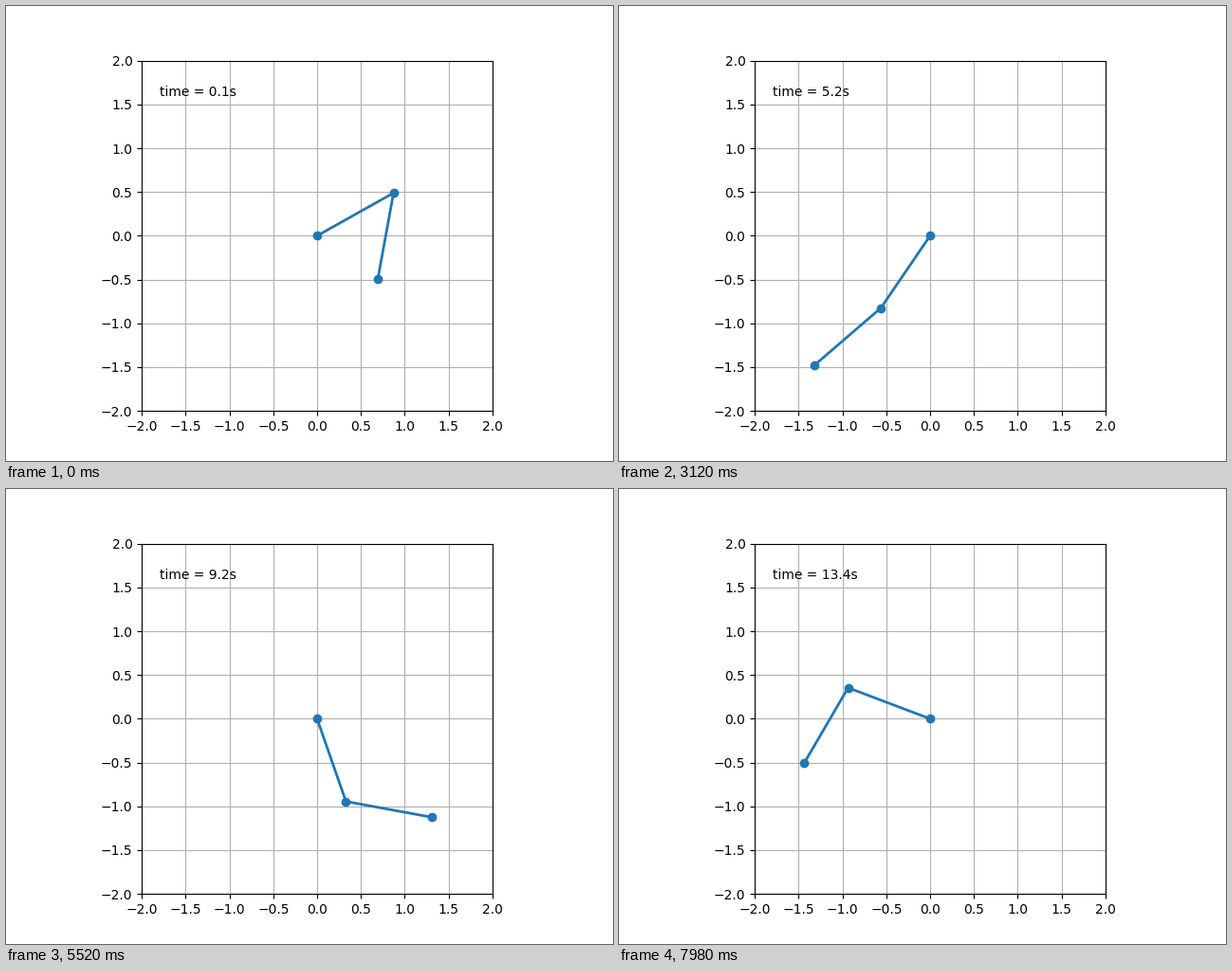
A matplotlib script that plays this animation: 640 by 480 pixels, repeating every 8 s.

```python
from math import cos, radians, sin

import matplotlib.pyplot as plt
from matplotlib.animation import FuncAnimation

G = 9.8          # gravity; both rods have length 1 and both bobs mass 1
DT = 0.05        # time between stored states
SUBSTEPS = 50    # integrator steps per stored state
TICK = 20        # ms per drawn frame
HOLD = 3         # drawn frames per pose
FRAMES = 400


def derivs(state):
    a1, w1, a2, w2 = state
    s, c = sin(a2 - a1), cos(a2 - a1)
    den = 2 - c * c
    acc1 = (w1 * w1 * s * c + G * sin(a2) * c + w2 * w2 * s
            - 2 * G * sin(a1)) / den
    acc2 = (-w2 * w2 * s * c + 2 * G * sin(a1) * c - 2 * w1 * w1 * s
            - 2 * G * sin(a2)) / den
    return w1, acc1, w2, acc2


def shift(state, slope, h):
    return [v + h * d for v, d in zip(state, slope)]


def rk4(state, h):
    k1 = derivs(state)
    k2 = derivs(shift(state, k1, h / 2))
    k3 = derivs(shift(state, k2, h / 2))
    k4 = derivs(shift(state, k3, h))
    mean = [(a + 2 * b + 2 * c + d) / 6 for a, b, c, d in zip(k1, k2, k3, k4)]
    return shift(state, mean, h)


def solve(count):
    state = [radians(120), 0.0, radians(-10), 0.0]
    states = [state]
    for _ in range(count):
        for _ in range(SUBSTEPS):
            state = rk4(state, DT / SUBSTEPS)
        states.append(state)
    return states


def step_of(frame):
    return 1 + 2 * (frame // HOLD)


states = solve(step_of(FRAMES - 1))

fig = plt.figure(figsize=(6.4, 4.8), dpi=100)
ax = fig.add_subplot(autoscale_on=False, xlim=(-2, 2), ylim=(-2, 2))
ax.set_aspect("equal")
ax.grid()
rods, = ax.plot([], [], "o-", lw=2)
clock = ax.text(0.05, 0.9, "", transform=ax.transAxes)


def draw(frame):
    step = step_of(frame)
    a1, _, a2, _ = states[step]
    x1, y1 = sin(a1), -cos(a1)
    rods.set_data([0, x1, x1 + sin(a2)], [0, y1, y1 - cos(a2)])
    clock.set_text(f"time = {step * DT:.1f}s")
    return rods, clock


def init():
    return draw(0)


anim = FuncAnimation(fig, draw, frames=FRAMES, init_func=init,
                     interval=TICK, repeat=True, repeat_delay=0)
plt.show()
```
